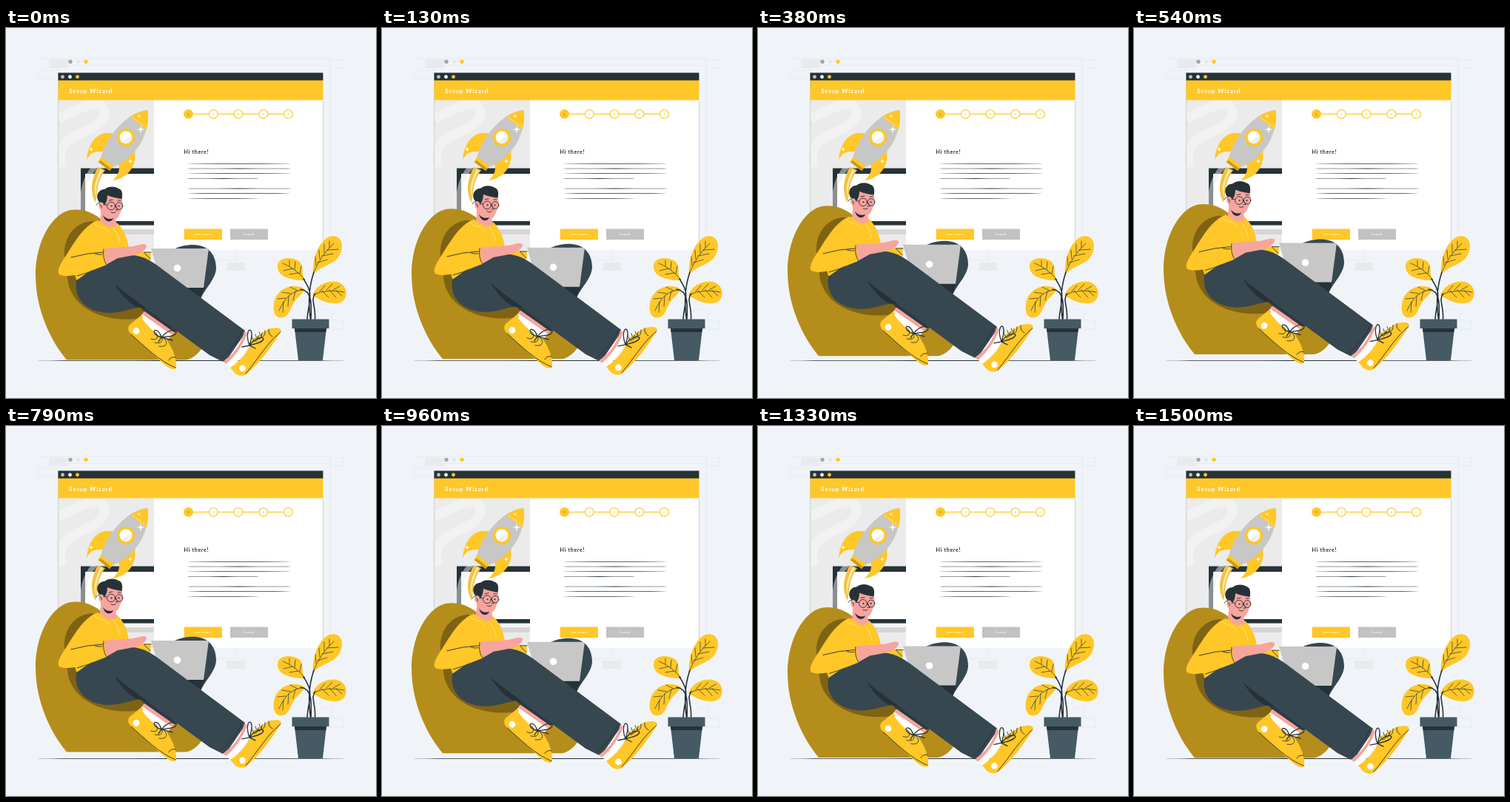
Recreate the animation shown at these times as an HTML page. Size 500 px wide and 500 px high, loop 1540 ms.

```html
<!DOCTYPE html>
<html lang="en">
<head>
<meta charset="utf-8">
<title>Setup Wizard</title>
<style>
  html, body { margin: 0; width: 100%; height: 100%; overflow: hidden; background: #f0f4f9; }
  svg { display: block; width: 100%; height: 100%; }
  text { font-family: Lato, sans-serif; font-weight: 700; }
  .y { fill: #ffc727; }
  .d { fill: #263238; }
  .g { fill: #c7c7c7; }
  .p { fill: #37474f; }
  .s { fill: #f7a49e; }
  .w { fill: #fff; }
  .ghost { fill: none; stroke: #e3e7ec; stroke-width: .8; }
  .ink { fill: none; stroke: #263238; stroke-width: .9; stroke-linecap: round; stroke-linejoin: round; }
  .fine { stroke-width: .7; }
  .bold { stroke-width: 1.3; }
  .tiny { font-size: 4px; text-anchor: middle; }
</style>
</head>
<body>
<svg viewBox="0 0 500 500">
  <!-- faint back windows -->
  <path class="ghost" d="M43 41H438V300M58 50.5H438M58 43H84M438 43H456V54H438M43 57H70M43 57V68H70M255 314H310V300M427 381H441V395H456V407H436"/>
  <path fill="#e8eaec" d="M58 43H84V54H58ZM298 317H323V328H298Z"/>
  <circle cx="87" cy="45.5" r="2.7" fill="#a6a6a6"/>
  <circle cx="97.5" cy="45.5" r="2.7" fill="#e6e8ea"/>
  <circle cx="108" cy="45.5" r="2.7" class="y"/>

  <!-- window -->
  <path class="w" d="M70.5 61H428.5V300H70.5Z"/>
  <path fill="#ebebeb" d="M71 97H200V300H71Z"/>
  <path fill="none" stroke="#f2f2f2" stroke-width="13" d="M76 188C65 160 89 147 108 139C130 130 139 117 129 105C116 97 96 112 71 122"/>
  <path fill="none" stroke="#b9c0c4" stroke-width=".7" d="M70.5 61V300M428.5 98V300"/>
  <path class="d" d="M70.5 60.600H428.500V71H70.500Z"/>
  <path class="y" d="M70.500 70.700H428.500V97.600H70.500Z"/>
  <circle cx="76.500" cy="66" r="2.400" fill="#c2c2c2"/>
  <circle cx="86.500" cy="66" r="2.400" class="w"/>
  <circle cx="96.500" cy="66" r="2.400" class="y"/>
  <text x="85" y="88" font-size="8" letter-spacing=".9" class="w">Setup Wizard</text>

  <!-- screen and rocket -->
  <path class="d" d="M101 189.500H200V266.500H101Z"/>
  <path class="w" d="M107 197H200V261H107Z"/>
  <path fill="#f7f7f7" d="M107 267.500H200V272H107Z"/>
  <path fill="#d6d6d6" d="M107 272H200V279H107Z"/>
  <path fill="none" stroke="#ebebeb" stroke-width="7" opacity=".5" d="M104 250C102 222 106 203 120 188"/>
  <path fill="#f0c342" d="M124 188C115 204 113 222 121 236C124 226 121 210 134 192Z"/>
  <path fill="#ffe7a6" d="M128 191C120 206 118 218 121 230C121 216 124 204 131 192Z"/>
  <path class="y" d="M147 143C125 137 111 154 109 178C114 168 122 165 133 168Z"/>
  <path class="y" d="M174 164C178 190 161 204 144 206C153 198 155 190 151 182Z"/>
  <path class="g" d="M191 111C164 113 136 146 128 175L145 188C174 176 196 144 191 111Z"/>
  <path class="y" d="M191.500 111C183 112 175 115 168 121L190 137C192 128 193 119 191.500 111Z"/>
  <path fill="none" stroke="#fff" stroke-width="1" stroke-dasharray="1.500 1.500" d="M171 121L189 134"/>
  <path class="y" d="M129 174L145 187L140 193L124 181Z"/>
  <path fill="#c99b18" d="M128 179L142 190L140 193L125 181Z"/>
  <circle cx="162" cy="148" r="12" class="y"/>
  <circle cx="162" cy="148" r="8.500" fill="#f0f0f0"/>
  <path class="w" d="M154 146A8.500 8.500 0 0 1 170 145L156 154Z"/>
  <g id="sparkles" class="w"></g>

  <!-- wizard panel -->
  <g id="steps" class="y"></g>
  <text x="240.500" y="170" font-size="7" letter-spacing=".7" class="d">Hi there!</text>
  <g id="lines" class="d"></g>
  <path class="y" d="M240.700 271.600H292V286H240.700Z"/>
  <path fill="#c2c2c2" d="M303 271.600H354V286H303Z"/>
  <text class="tiny w" x="266.500" y="280.400" letter-spacing=".4">Let's start</text>
  <text class="tiny w" x="328.500" y="280.400" letter-spacing=".4">Cancel</text>

  <!-- floor and plant -->
  <ellipse class="d" cx="250" cy="449.400" rx="208" ry=".5"/>
  <g class="y">
    <path d="M415 334C413 310 425 282 442 281C458 282 457 304 445 314C435 322 421 324 415 334Z"/>
    <path d="M404 341C398 332 404 322 396 315C384 308 368 310 367 321C366 334 380 341 404 341Z"/>
    <path d="M404 353C390 344 371 350 364 365C359 379 362 391 371 391.500C382 392 384 379 389 371C394 363 400 361 404 353Z"/>
    <path d="M414 361C419 347 437 339 450 344C462 349 462 364 455 369C446 376 428 371 414 361Z"/>
  </g>
  <path class="ink fine" d="M415 332Q425 307 443 291M419 321L418 309M424 312L423 300M430 304L430 292M437 297V288M421 317L434 313M427 308L442 305M434 300L449 299M404 340Q390 324 374 318M397 332L399 322M390 327L391 316M383 322V314M395 331L383 333M387 325L375 328M402 354Q381 354 369 382M394 355L384 350M385 359L373 357M378 365L367 366M391 356L388 368M382 362L381 376M375 370L374 384M416 360Q435 352 457 357M424 356L431 348M433 354L441 346M442 354L451 349M427 355L436 364M437 354L446 364M446 355L454 362"/>
  <path class="ink" style="stroke-width:1.600" d="M407 394C408 376 413 367 410 355C408 348 405 344 402 339M411.500 394C409 374 408 354 416 330M412 394C413 374 414 355 398 353M417.500 394C419 376 411 367 418 359"/>
  <path fill="#455a64" d="M386.500 393.500H436.500V406H433L428 449H395L390 406H386.500Z"/>
  <path class="d" d="M390 406H433L432.400 411H390.600Z"/>

  <!-- person on the bean bag -->
  <g id="float">
    <path fill="#b58d1b" d="M82 448.500C60 422 40 380 40 334C40 289 63 245.500 93 245.500C113 245 130 256 143 274L272 412C270 430 258 446 243 448.500Z"/>
    <path fill="#7f6314" d="M117 261C93 262 77 283 79 308L84 345C91 377 130 402 192 391L200 370L150 280Z"/>
    <path class="p" d="M224 300C250 287 284 290 284 325C283 340 269 352 263 366L235 350Z"/>
    <path class="d" d="M241 350H269L262 367Z"/>

    <!-- left shoe and calf -->
    <path class="w" d="M186 384L227 411L219 421L180 393Z"/>
    <path class="s" d="M188 382L228 410L224 415L184 387Z"/>
    <path class="y" d="M183 388L167 401C164 405 165 409 168 413L211 452C219 460 228 464 230 459C231 447 226 434 217 421C206 414 195 403 183 388Z"/>
    <path class="w" d="M187 389L223 414L217 421C205 416 194 406 184 393Z"/>
    <path class="ink" d="M169 414C186 429 208 451 229 459M220 449Q222 444 229 445M196 420C205 424 207 416 202 411M201 425C211 428 214 421 208 415M207 430C217 432 220 425 213 419"/>
    <path class="ink bold" d="M210 418C198 415 198 406 204 409C208 411 209 415 210 418C218 408 230 406 230 411C230 417 217 417 210 418L225 422M210 418L206 424"/>
    <circle cx="176" cy="409.500" r="4.400" class="w"/>
    <path fill="#2c3a42" d="M150 348L186 382L227 411L247 406L190 350Z"/>

    <!-- torso, head -->
    <path class="y" d="M126 261L151 264C160 274 164 284 166 297L185 303L196 303L195 315L150 320L96 343L92 330Z"/>
    <path class="s" d="M129 238L127 262C132 271 143 272 150 266L146 250Z"/>
    <path class="s" d="M128 229C125 236 126 248 132 254C137 262 149 262 153 253C155 248 156 245 157 244L158 240L156 224L138 222Z"/>
    <path class="d" d="M131 253C134 264 143 263 145 257C140 259 135 258 131 253Z"/>
    <path class="d" d="M124 232C121 224 127 218 133 218C139 213 148 214 152 217C157 218 158 224 156.500 231C151 230 144 229 137 226C137 232 135 237 133 239L130 236C127 236 125 235 124 232Z"/>
    <ellipse cx="128.500" cy="240" rx="3.300" ry="4.500" class="s"/>
    <path class="ink" d="M122 239Q124 235 127 236M127 239Q130 239 129 243M139 233L144 232M151 233L155 233M148 240L151 246H148M142 249Q145 251 148 249M132 239H136.500"/>
    <circle cx="142" cy="240.500" r="5.400" class="ink"/>
    <circle cx="153" cy="240.500" r="4.800" class="ink"/>
    <circle cx="142.500" cy="240.500" r="1.100" class="d"/>
    <circle cx="152.500" cy="240.500" r="1.100" class="d"/>

    <!-- laptop, near leg -->
    <path class="g" d="M196 298H274L267 351H235L204 326Z"/>
    <circle cx="231.500" cy="324.500" r="4.800" class="w"/>
    <path class="p" d="M95 341C110 332 137 307 169 307C187 307 201 318 214 328L323 409C318 428 307 441 293 451L275 442L188 378C172 376 161 385 138 385C112 384 91 369 95 341Z"/>
    <path class="d" d="M147 346C160 358 175 367 190 379L176 377C163 369 154 358 147 346Z"/>
    <path class="ink" d="M291 446Q309 431 319 410"/>

    <!-- near arm -->
    <path class="y" d="M124 260C107 266 96 284 82 306C73 319 68 329 72 333C82 339 109 331 136 320L152 300L140 270Z"/>
    <path class="s" d="M132 299C145 295 165 298 180 293C190 290 193 294 187 300C181 307 166 308 151 311L136 319.500Z"/>
    <path class="ink" d="M132 299C131 307 132 314 136 320M131 303Q109 304 88 310M120 305Q126 307 130 306M186 303L196 303M187 304L195 312M96 335L112 330"/>
    <path fill="none" stroke="#ffe5a0" stroke-width=".8" d="M119 264C126 271 131 266 139 276M145 270Q153 282 154 290"/>

    <!-- right shoe -->
    <path class="w" d="M324 411L335 421L305 461L296 452Z"/>
    <path class="s" d="M322 410L326 412.500C320 430 309 444 297.500 454L293.500 451C308 440 318 427 322 410Z"/>
    <path class="y" d="M333 420C341 417 349 408 358 406C367 404 374 406 371 411C360 430 344 451 326 467C320 472 312 470 308 465L303 459C318 449 328 437 333 420Z"/>
    <path class="ink" d="M371 411C354 424 341 447 324 467M355 407Q354 414 360 417M332 416C334 426 340 426 341 416M337 414C339 423 345 423 346 412M342 411C345 420 350 419 350 409"/>
    <path class="ink bold" d="M329 429C324 416 327 405 331 409C334 414 331 423 329 429C335 420 346 416 348 420C347 425 337 427 329 429L319 431M329 429L337 433"/>
    <circle cx="319.500" cy="460" r="4.400" class="w"/>
  </g>
</svg>
<script>
  const $ = id => document.getElementById(id);

  const sparkle = ([x, y, r]) => {
    const k = r / 5;
    return `<path d="M${x} ${y - r}L${x + k} ${y - k}L${x + r} ${y}L${x + k} ${y + k}L${x} ${y + r}L${x - k} ${y + k}L${x - r} ${y}L${x - k} ${y - k}Z"/>`;
  };
  $('sparkles').innerHTML = [[182, 137, 5.5], [115, 164, 3.5], [168, 180, 3.5], [180, 119, 3]].map(sparkle).join('');

  const step = i => {
    const x = 246.5 + i * 33.75, first = i === 0;
    const link = i < 4 ? `<path d="M${x + 6} 116.3H${x + 27.75}" stroke="#ffc727" stroke-width="1.2"/>` : '';
    return `${link}<circle cx="${x}" cy="116.3" r="5.8" fill="${first ? '#ffc727' : '#fff'}" stroke="#ffc727" stroke-width="1.2"/>
      <text class="tiny" x="${x}" y="117.8" fill="${first ? '#8a6c1a' : '#ffc727'}">${i + 1}</text>`;
  };
  $('steps').innerHTML = [0, 1, 2, 3, 4].map(step).join('');

  const line = ([y, right]) =>
    `<ellipse cx="${(244 + right) / 2}" cy="${y}" rx="${(right - 244) / 2}" ry=".4"/>`;
  $('lines').innerHTML = [[183.3, 386], [190, 386], [196.7, 386], [203.5, 342], [217, 386], [223.6, 386], [230.3, 342]].map(line).join('');

  const LOOP = 1540, LEAD = 65, SWING = 4.25;
  const lift = t => SWING * Math.cos((t + LEAD) / LOOP * 2 * Math.PI);
  const person = $('float'), start = performance.now();
  function draw() {
    const t = (performance.now() - start) % LOOP;
    person.setAttribute('transform', `translate(0 ${(lift(t) - lift(0)).toFixed(2)})`);
    requestAnimationFrame(draw);
  }
  draw();
</script>
</body>
</html>
```
